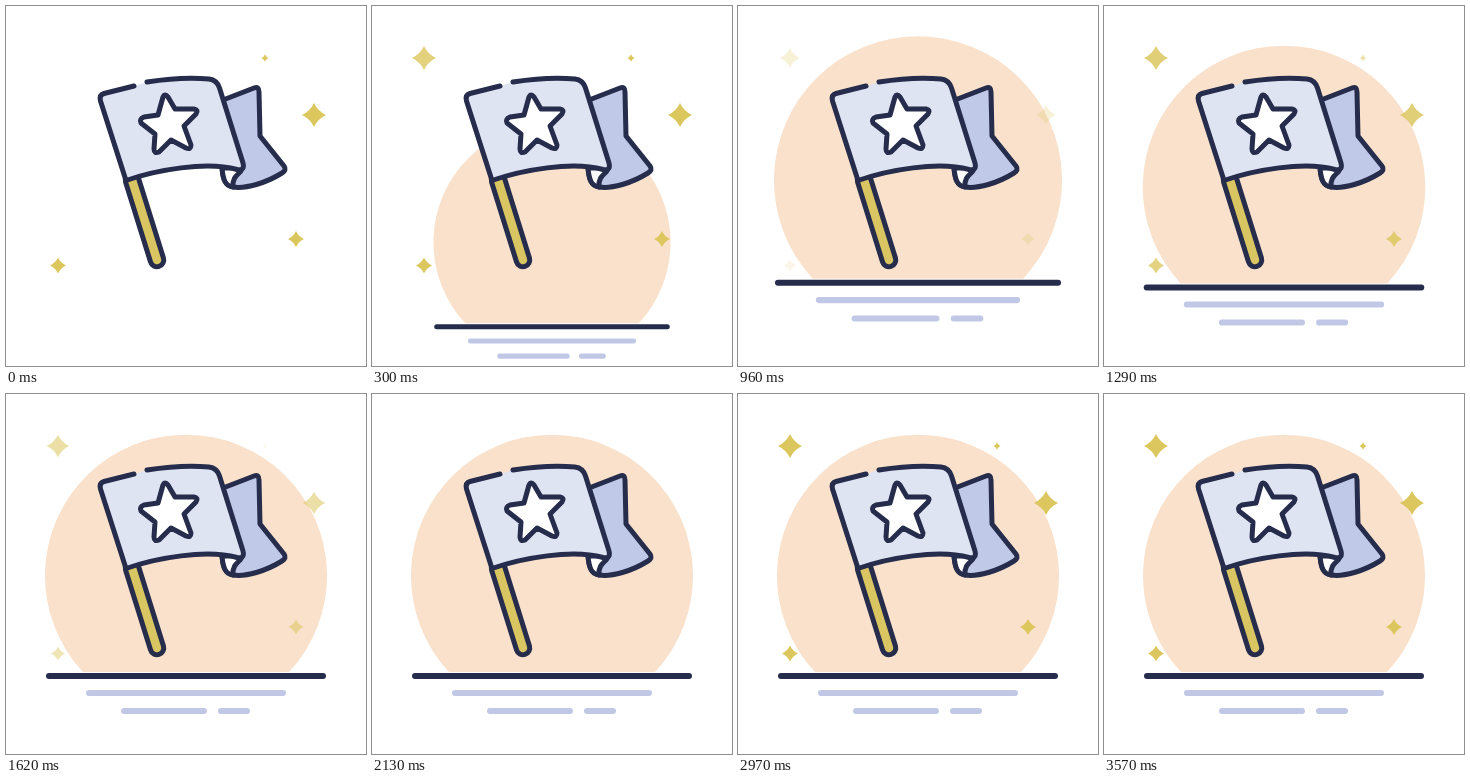
An HTML page for the animation above (3600 ms loop, 360 by 360 pixels).

```html
<!DOCTYPE html>
<html lang="en">
<head>
<meta charset="utf-8">
<title>Flag</title>
<style>
  html, body { margin: 0; height: 100%; overflow: hidden; background: #fff; }
  svg { display: block; width: 100%; height: 100%; }
  .ink { stroke: #262c4b; stroke-width: 5; stroke-linecap: round; stroke-linejoin: round; }
</style>
</head>
<body>
<svg viewBox="0 0 360 360" fill="none" stroke-linecap="round">
  <!-- scene coordinates are relative to the centre of the disc -->
  <g id="scene">
    <path d="M-103 98A141 141 0 1 1 103 98Z" fill="#f9e1cb"/>
    <path d="M-137 102H137" stroke="#262c4b" stroke-width="6"/>
    <path d="M-97 119H97M-62 137H18M35 137H61" stroke="#c0c8e6" stroke-width="6"/>
  </g>
  <g id="sparkles" fill="#dcc65e"></g>
  <g class="ink">
    <path d="M126 174L151 254" style="stroke-width:18.5"/>
    <path d="M126 174L151 254" stroke="#dac563" style="stroke:#dac563;stroke-width:8.5"/>
    <path fill="#c1c9e8" d="M217 94L248 82Q253 80 253 86L254 130L278 160Q281 164 276 167C260 177 240 183 227 181C219 180 217 173 216 162Z"/>
    <path fill="#fff" d="M216 162L236 162C236 168 226 168 227 181C219 180 217 173 216 162Z"/>
    <path fill="#dfe4f3" d="M128 80L98 87.500Q93 89 94.500 95L120 174.500C150 164 200 155 231 163.500Q239 165 237 157L213.500 82Q211 74 203 73C182 71 160 73 141 76"/>
    <path fill="#fff" d="M157 91Q159 87 162 91L169 103L188 103Q193 104 190 108L178 120L185 139Q185 144 180 142L165 134L153 146Q148 148 148 143L149 128L135 117Q133 113 138 111L152 109Z"/>
  </g>
</svg>
<script>
const LOOP = 3600;
const scene = document.getElementById('scene');
const sparkleLayer = document.getElementById('sparkles');

// x, y, radius, fade strength
const sparkles = [
  [52, 52, 12, 1], [308, 109, 12, 1], [290, 233, 8, 1],
  [52, 259.500, 8, 1.400], [259, 52, 3.500, 4]
].map(([x, y, r, fade]) => {
  const el = document.createElementNS('http://www.w3.org/2000/svg', 'path');
  const c = r * 0.32;
  el.setAttribute('d', `M0 ${-r}Q${c} ${-c} ${r} 0Q${c} ${c} 0 ${r}Q${-c} ${c} ${-r} 0Q${-c} ${-c} 0 ${-r}Z`);
  sparkleLayer.append(el);
  return { el, x, y, fade };
});

const glowKeys = [[0, 1], [350, 1], [510, 0.88], [960, 0.25], [1320, 0.9],
  [1620, 0.56], [2080, 0], [2250, 0], [2700, 1], [LOOP, 1]];

function tween(keys, t) {
  const i = keys.findIndex(k => k[0] > t);
  const [t0, a] = keys[i - 1], [t1, b] = keys[i];
  return a + (b - a) * (t - t0) / (t1 - t0);
}

// Fast rise past full size, then a soft settle.
function sceneScale(t) {
  if (t < 690) return 1.053 * (1 - (1 - t / 690) ** 2.8);
  return 1 + 0.053 * Math.max(0, (1440 - t) / 750) ** 2;
}

function draw(t) {
  const s = sceneScale(t);
  scene.setAttribute('transform', `translate(180 ${526 - 346 * s}) scale(${s})`);
  const glow = tween(glowKeys, t);
  sparkles.forEach(({ el, x, y, fade }, i) => {
    const intro = i ? 1 : Math.min(1, Math.max(0, (t - 60) / 300));
    const o = glow ** fade * intro;
    el.setAttribute('opacity', o);
    el.setAttribute('transform', `translate(${x} ${y}) scale(${0.7 + 0.3 * Math.min(1, o * 1.4)})`);
  });
}

const start = performance.now();
function tick() {
  draw((performance.now() - start) % LOOP);
  requestAnimationFrame(tick);
}
tick();
</script>
</body>
</html>
```
